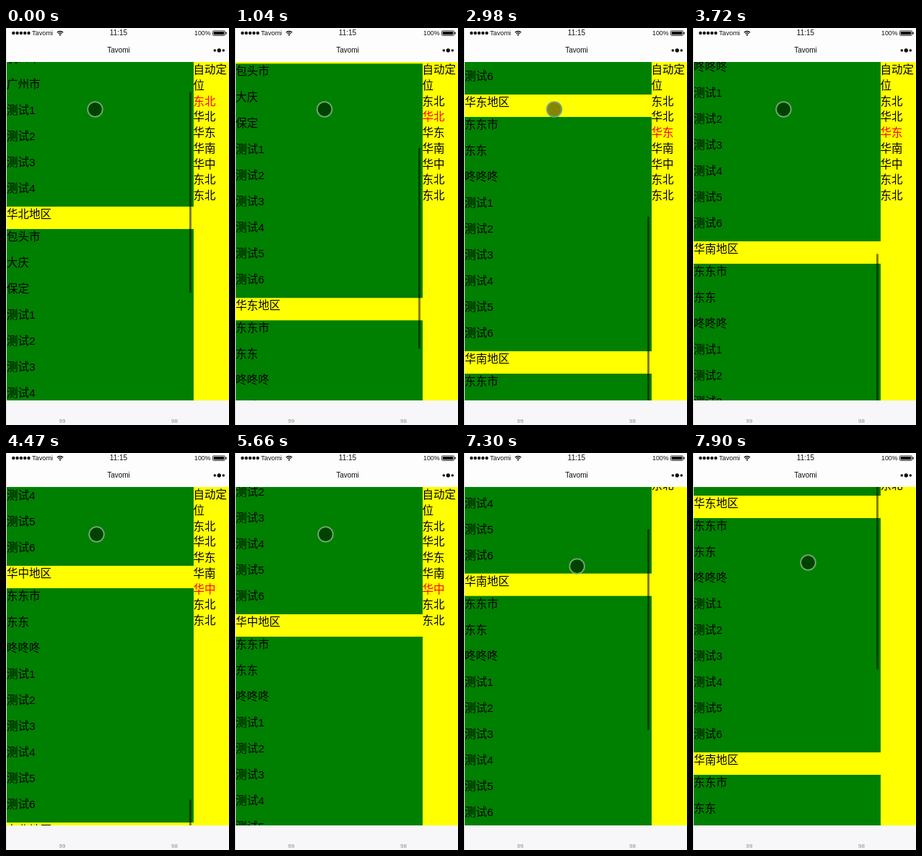
Animation of 309 by 549 pixels, one loop 8000 ms. Source, as an HTML page:

```html
<!DOCTYPE html>
<html lang="zh-CN">
<head>
<meta charset="utf-8">
<style>
  html, body { margin: 0; width: 100%; height: 100%; overflow: hidden; background: #fdfdfd; }
  body { position: relative; color: #000; font: 15.5px/22px "Liberation Sans", "Noto Sans CJK SC", "Noto Sans CJK", sans-serif; }
  div { position: absolute; }
  #view { left: 0; top: 47px; width: 309px; height: 468px; overflow: hidden; background: #ff0; }
  #page { left: 1px; top: 0; width: 308px; height: 824px; overflow: hidden; }
  #list { left: 0; top: 0; width: 258.5px; background: green; }
  #list p { margin: 0; height: 36px; white-space: nowrap; }
  #list p.head { height: 31px; background: #ff0; }
  #side { left: 258.5px; top: 0; width: 50px; line-height: 21.75px; }
  #side p { margin: 0; }
  #side .on { color: red; }
  #bar { left: 252.5px; top: 1px; width: 3px; height: 278px; border-radius: 2px; background: rgba(0, 0, 0, .5); }
  #foot { left: 0; top: 515px; width: 309px; height: 34px; background: #f7f7f9; }
  #edge { left: 0; top: 0; width: 1px; height: 549px; background: #e4e4e4; }
  svg { position: absolute; left: 0; top: 0; }
  svg text { font-family: "Liberation Sans", Arial, sans-serif; }
</style>
</head>
<body>
<div id="view"><div id="page">
  <div id="list"></div>
  <div id="side"></div>
  <div id="bar"></div>
</div></div>
<div id="foot"></div>
<div id="edge"></div>
<svg width="309" height="549" fill="#111">
  <g id="signal"></g>
  <text x="36" y="10" font-size="9.2">Tavomi</text>
  <g fill="none" stroke="#111" stroke-width="1.3">
    <path d="M70.8 6.2a6 6 0 0 1 8.4 0M72.5 8.1a3.6 3.6 0 0 1 5 0"/>
    <rect x="286.5" y="3.8" width="17" height="6.6" rx="1.4" stroke-width=".8"/>
  </g>
  <circle cx="75" cy="9.6" r="1.1"/>
  <text x="156" y="9.8" font-size="10" text-anchor="middle">11:15</text>
  <text x="261" y="10" font-size="8.8">100%</text>
  <rect x="287.7" y="5" width="14.6" height="4.2" rx=".6"/>
  <rect x="304.4" y="5.6" width="1.4" height="3" rx=".7"/>
  <text x="156" y="33.5" font-size="10" text-anchor="middle">Tavomi</text>
  <circle cx="289.3" cy="31" r="1.8"/>
  <circle cx="295.3" cy="31" r="2.7"/>
  <circle cx="301.3" cy="31" r="1.8"/>
  <g font-size="8" fill="#8c8c8c" text-anchor="middle">
    <text x="78" y="546">99</text>
    <text x="233.5" y="546">98</text>
  </g>
  <circle id="dot" r="10.3" fill="rgba(0,0,0,.48)" stroke="#74a874" stroke-width="1.8"/>
</svg>
<script>
const $ = id => document.getElementById(id);
const LOOP = 8000, START = 119;

const tests = n => Array.from({ length: n }, (_, i) => '测试' + (i + 1));
const common = ['东东市', '东东', '咚咚咚', ...tests(6)];
const areas = ['东北', '华北', '华东', '华南', '华中', '东北', '东北'];
const places = [
  ['北京市', '上海市', '杭州市', '广州市', ...tests(4)],
  ['包头市', '大庆', '保定', ...tests(6)]
];

function add(parent, text, cls = '') {
  const p = document.createElement('p');
  p.textContent = text;
  p.className = cls;
  parent.append(p);
  return p;
}
areas.forEach((area, i) => {
  add($('list'), area + '地区', 'head');
  (places[i] || common).forEach(name => add($('list'), name));
});
add($('side'), '自动定位');
const links = areas.map(area => add($('side'), area));

for (let i = 0; i < 5; i++) {
  $('signal').innerHTML += `<circle cx="${10.3 + i * 5.3}" cy="7" r="2.2"/>`;
}

// The picture only refreshes at these times.
const ticks = [0, 300, 600, 750, 1040, 1340, 1640, 1790, 1930, 2230, 2680, 2980, 3270,
  3570, 3720, 3870, 4020, 4320, 4470, 4770, 5060, 5360, 5660, 5950, 6250, 6400, 6550,
  6700, 6850, 7000, 7150, 7300, 7450, 7600, 7900];

// Keys are [time, value].
const scroll = [[0, 0], [300, 70], [600, 187], [750, 212], [1340, 246], [1930, 260],
  [2230, 310], [2680, 420], [2980, 510], [3720, 662], [4020, 772], [4320, 990],
  [4470, 1156], [4770, 1130], [5360, 1089], [5660, 1089], [5950, 960], [6250, 793],
  [6850, 793], [7150, 690], [7600, 430], [7900, 356]];
const pageScroll = [[5950, 0], [6700, 187]];
const barAlpha = [[5060, 1], [5660, 0], [5950, 1], [6250, 1], [6700, 0], [6850, 0], [7000, 1]];
const dotX = [[0, 123.5], [3720, 125.5], [5950, 125.5], [6850, 154.5], [7900, 159.5]];
const dotY = [[0, 112.5], [5950, 112.5], [6850, 160.5], [7900, 151.5]];

function at(keys, t) {
  const i = keys.findIndex(k => k[0] > t);
  if (i === 0) return keys[0][1];
  if (i < 0) return keys[keys.length - 1][1];
  const [t0, a] = keys[i - 1], [t1, b] = keys[i];
  return a + (b - a) * (t - t0) / (t1 - t0);
}
const shift = (id, y) => $(id).style.transform = `translateY(${y}px)`;

function draw(now) {
  const t = ticks.filter(k => k <= now % LOOP).pop();
  const y = START + at(scroll, t);
  shift('list', -y);
  shift('page', -at(pageScroll, t));
  shift('bar', y * .338);
  $('bar').style.opacity = at(barAlpha, t);
  $('dot').setAttribute('cx', at(dotX, t));
  $('dot').setAttribute('cy', at(dotY, t));
  const active = Math.floor(y / 300);
  links.forEach((p, i) => p.className = i === active ? 'on' : '');
}

const begin = performance.now();
function loop() {
  draw(performance.now() - begin);
  requestAnimationFrame(loop);
}
loop();
</script>
</body>
</html>
```
